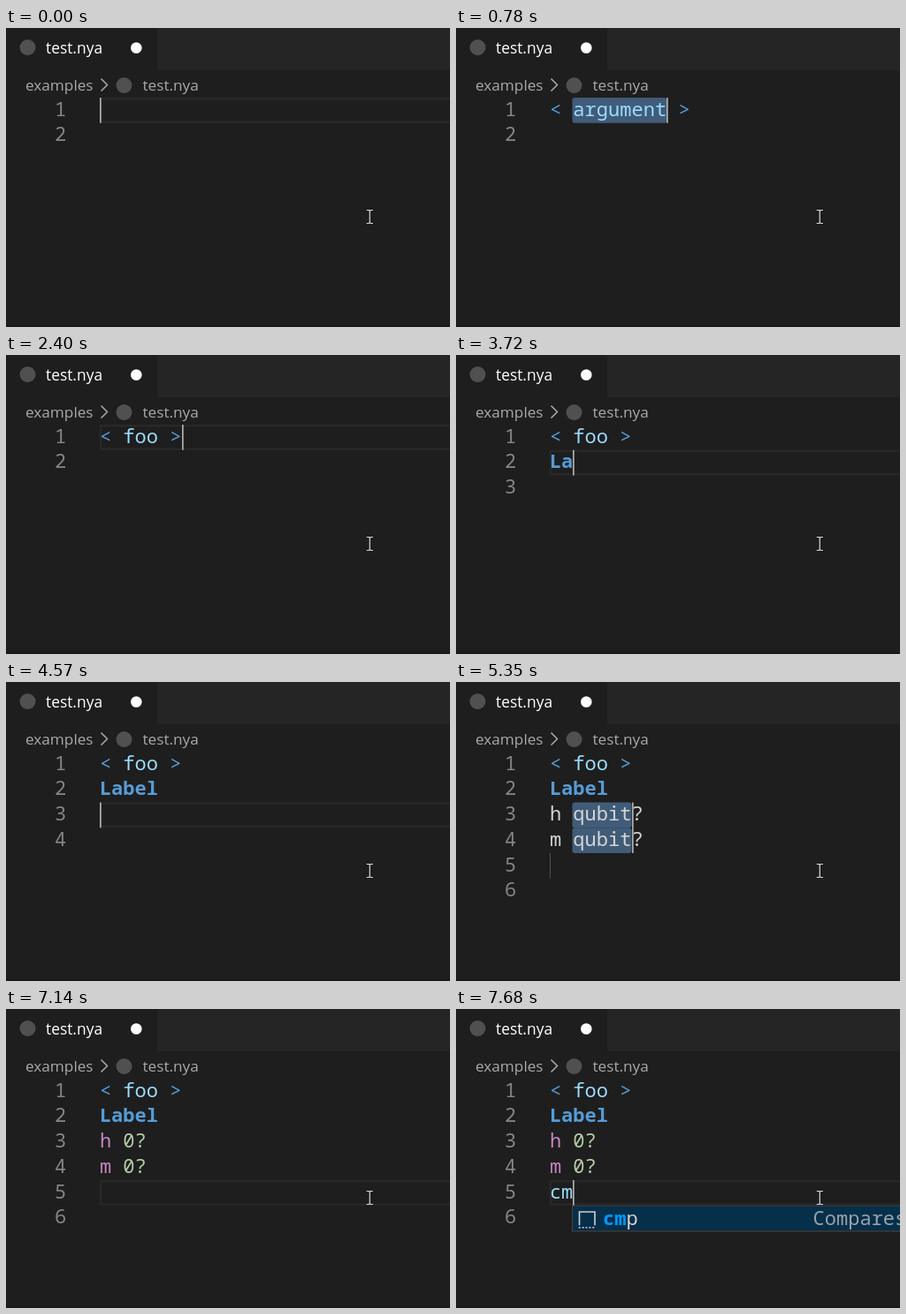
An HTML page that plays this animation: 502x339 px, repeating every 7990 ms.

```html
<!DOCTYPE html>
<html lang="en">
<head>
<meta charset="utf-8">
<title>Editor snippets</title>
<style>
  html, body { margin: 0; width: 100%; height: 100%; overflow: hidden; background: #1e1e1e; }
  svg { display: block; width: 502px; height: 339px; }
  text { white-space: pre; }
  .ui { font-family: "Open Sans", "Noto Sans", sans-serif; }
  .code { font: 22.05px "Noto Sans Mono", "DejaVu Sans Mono", monospace; }
  .bold { font-weight: 700; }
</style>
</head>
<body>
<svg viewBox="0 0 502 339">
  <rect width="502" height="339" fill="#1e1e1e"/>
  <rect x="171" width="331" height="48" fill="#252526"/>
  <rect y="337" width="502" height="2" fill="#191919"/>
  <g class="ui">
    <circle cx="24.5" cy="22" r="9" fill="#505050"/>
    <text x="45" y="28.5" font-size="17.4" fill="#fff">test.nya</text>
    <circle cx="147.3" cy="22.5" r="6.3" fill="#fff"/>
    <text x="22" y="70.5" font-size="17.2" fill="#a9a9a9">examples</text>
    <path d="M107.5 57.5l7 7l-7 7" fill="none" stroke="#a9a9a9" stroke-width="1.5"/>
    <circle cx="133.5" cy="65" r="9" fill="#505050"/>
    <text x="154.5" y="70.5" font-size="17.2" fill="#a9a9a9">test.nya</text>
  </g>
  <g id="editor" class="code"></g>
  <path id="beam" d="M407.7 206.5h2.6l1 1l1-1h2.6M411.3 207.5v13M407.7 221.5h2.6l1-1l1 1h2.6" fill="none" stroke="#d8d8d8" stroke-width="1.2"/>
  <path id="hand" d="M410 225v-10.5q1.3-2 2.6 0v5l6.5 1.3q1.7.5 1.7 2.2v3.500l-1.700 4h-8l-5.100-6.500q.5-1.800 2.300-.6z" fill="#fff" stroke="#000" stroke-width=".9"/>
</svg>
<script>
const LOOP = 7990, LEFT = 105.9, TOP = 79, CHAR = 13.23, ROW = 28.75;
const BLUE = '#569cd6', SKY = '#9cdcfe', PINK = '#c586c0', GREEN = '#b5cea8', PLAIN = '#d4d4d4';
const editor = document.getElementById('editor');
const beam = document.getElementById('beam');
const hand = document.getElementById('hand');

const colX = col => LEFT + col * CHAR;
const rowY = row => TOP + row * ROW;
const baseline = row => rowY(row) + 20.6;
const escapeText = s => s.replace(/</g, '&lt;').replace(/>/g, '&gt;');
const rect = (x, y, w, h, attrs) => `<rect x="${x}" y="${y}" width="${w}" height="${h}" ${attrs}/>`;
const span = ([s, color, cls = '']) => `<tspan fill="${color}" class="${cls}">${escapeText(s)}</tspan>`;
const label = (x, y, spans) => `<text x="${x}" y="${y}">${spans.map(span).join('')}</text>`;

// Code lines, each a list of [text, color, class]
const bracket = name => [['< ', BLUE], [name, SKY], [' >', BLUE]];
const word = s => [[s, SKY]];
const title = s => [[s, BLUE, 'bold']];
const gate = (key, keyColor, arg, argColor, markColor) => [[key + ' ', keyColor], [arg, argColor], ['?', markColor]];
const gates = (...rest) => ['h', 'm'].map(key => gate(key, ...rest));

const head = [bracket('foo')];
const labelled = [...head, title('Label')];
const raw = [...labelled, ...gates(PLAIN, 'qubit', PLAIN, PLAIN), []];
const colored = [...labelled, ...gates(PINK, 'qubit', SKY, PLAIN), []];
const measured = [...labelled, ...gates(PINK, '0', GREEN, GREEN)];

const argItems = [['args', 'Arguments'], ['add', 'Adds two'], ['and', 'Bitwise and'], ['asr', 'Shifts right']];
const gateItems = [['hm', 'Hadamard'], ['h', 'Hadamard']];
const cmpItems = [['cmp', 'Compares']];

const fooField = n => ({ lines: [bracket('foo'.slice(0, n))], carets: [[0, 2 + n]], field: [2, 2 + n] });
const typeLabel = n => ({ lines: [...head, title('Label'.slice(0, n))], carets: [[1, n]], count: 3 });
const twin = (lines, end, extra) => ({ lines, carets: [[2, end], [3, end]], field: [2, end], count: 6, finalStop: 4, ...extra });
const lastLine = (s, extra) => ({ lines: [...measured, word(s)], carets: [[4, s.length]], count: 6, ...extra });
const argument = { lines: [bracket('argument')], carets: [[0, 10]], field: [2, 10], selected: true };
const off = { hidden: true };

const states = [
  [0, { lines: [], carets: [[0, 0]] }],
  [80, { lines: [], carets: [[0, 0]], ...off }],
  [300, { lines: [word('a')], carets: [[0, 1]], items: argItems }],
  [780, argument],
  [1240, { ...argument, ...off }],
  [1550, fooField(1)],
  [1850, fooField(2)],
  [2020, fooField(3)],
  [2400, { lines: head, carets: [[0, 7]] }],
  [2780, typeLabel(0)],
  [3260, { ...typeLabel(0), ...off }],
  [3410, typeLabel(1)],
  [3720, typeLabel(2)],
  [3960, typeLabel(3)],
  [4110, typeLabel(4)],
  [4190, typeLabel(5)],
  [4570, { lines: labelled, carets: [[2, 0]], count: 4 }],
  [4970, { lines: [...labelled, word('h')], carets: [[2, 1]], count: 4, items: gateItems }],
  [5350, twin(raw, 7, { selected: true })],
  [5430, twin(colored, 7, { selected: true })],
  [5900, twin(colored, 7, { selected: true, ...off })],
  [6210, twin([...measured, []], 3)],
  [6600, lastLine('')],
  [7140, lastLine('', off)],
  [7370, lastLine('c', { items: cmpItems })],
  [7680, lastLine('cm', { items: cmpItems })]
];

function popup(row, col, items) {
  const x = Math.round(colX(col)) - 0.5, y = rowY(row + 1);
  const typed = col;
  let out = rect(x, y + 0.5, 430, items.length * ROW, 'fill="#252526" stroke="#454545"');
  items.forEach(([name, detail], i) => {
    const top = y + i * ROW, base = top + 22;
    if (i === 0) out += rect(x + 1, top + 1, 429, ROW - 1.5, 'fill="#062f4a"');
    out += `<g fill="none" stroke="#d0d0d0" stroke-width="1.6" transform="translate(${x + 8} ${top + 6.5})">
      <path d="M0 16V.8H17.500V16"/><path d="M-.8 18.500H18.500" stroke-dasharray="2 1.900"/></g>`;
    out += label(x + 34.5, base, [[name.slice(0, typed), '#0097fb', 'bold'], [name.slice(typed), PLAIN]]);
    out += label(x + 272, base, [[detail, '#98a3aa']]);
  });
  return out;
}

function draw({ lines, carets, field, selected, finalStop, items, hidden, count = 2 }) {
  let out = '';
  if (!selected) {
    for (const [row] of carets) {
      out += rect(LEFT + 1.1, rowY(row) + 1.2, 420, ROW - 2.4, 'fill="none" stroke="#282828" stroke-width="2.4"');
    }
  }
  if (field) {
    const [from, to] = field;
    for (const [row] of carets) {
      const style = selected ? 'fill="#405c79" rx="3"' : 'fill="#3a3a3a"';
      out += rect(colX(from) - 0.9, rowY(row), (to - from) * CHAR + 0.9, ROW, style);
    }
  }
  if (finalStop) out += rect(106, rowY(finalStop), 1, ROW, 'fill="#525252"');
  for (let i = 0; i < count; i++) out += label(55, baseline(i), [[String(i + 1), '#858585']]);
  lines.forEach((line, i) => { out += label(LEFT, baseline(i), line); });
  if (!hidden) {
    for (const [row, col] of carets) out += rect(Math.round(colX(col)), rowY(row), 1.7, ROW, 'fill="#aeafad"');
  }
  if (items) out += popup(...carets[0], items);
  editor.innerHTML = out;
  // The pointer becomes a hand when the list lies under it
  const over = items && rowY(carets[0][0] + 1) < 214;
  beam.style.display = over ? 'none' : '';
  hand.style.display = over ? '' : 'none';
}

const start = performance.now();
let shown = null;
function tick(now) {
  const t = Math.max(0, now - start) % LOOP;
  const state = states.findLast(([time]) => time <= t)[1];
  if (state !== shown) draw(shown = state);
  requestAnimationFrame(tick);
}
tick(start);
</script>
</body>
</html>
```
